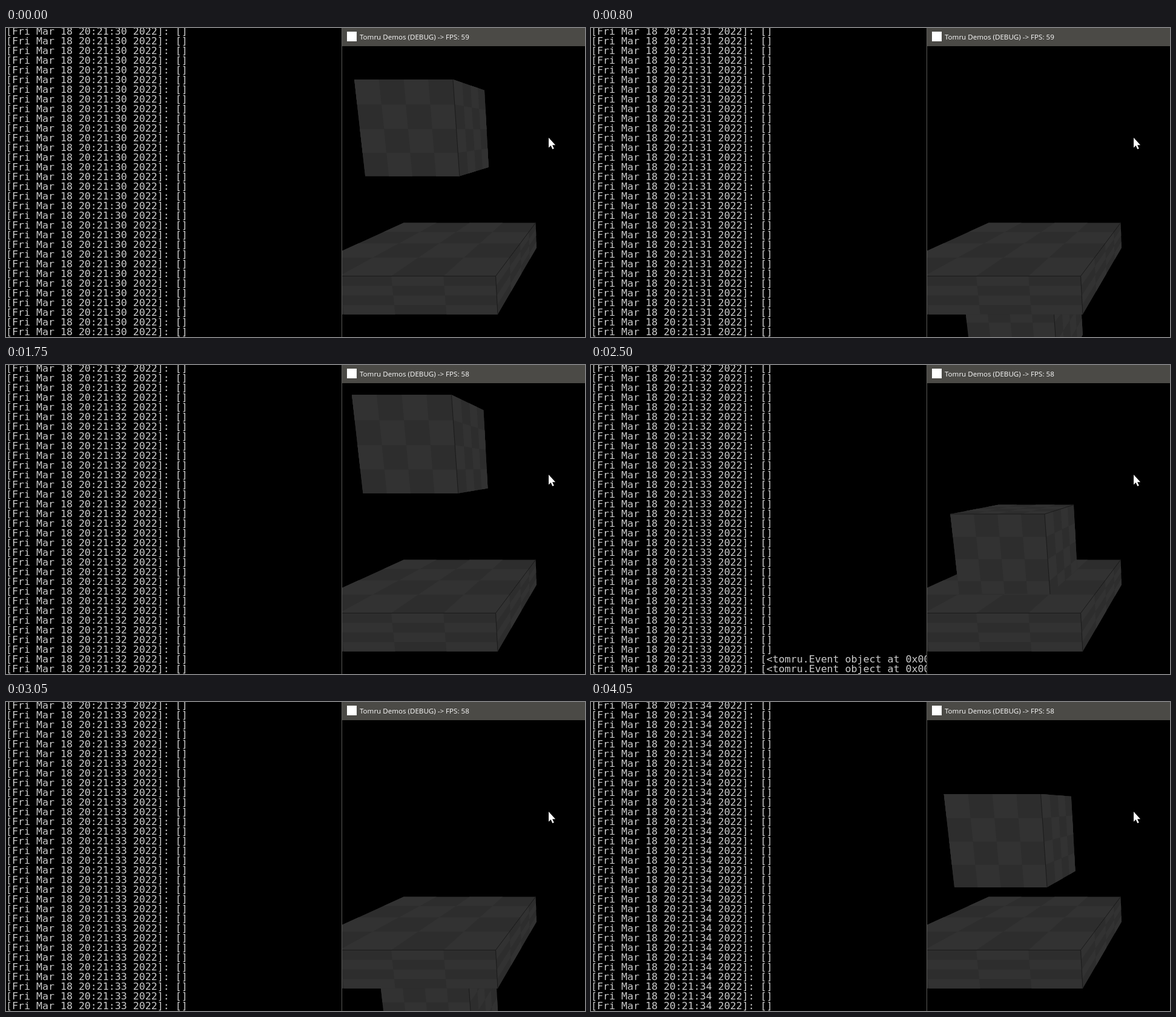
Animation, 956 px wide and 510 px high, one loop 4.1 s. Source, as an HTML page with a canvas:

```html
<!DOCTYPE html>
<html lang="en">
<head>
<meta charset="utf-8">
<title>Collision log</title>
<style>
  html, body { margin: 0; width: 100%; height: 100%; overflow: hidden; background: #000; }
  canvas { display: block; }
</style>
</head>
<body>
<canvas id="stage" width="956" height="510"></canvas>
<script>
const ctx = document.getElementById('stage').getContext('2d');
const LOOP = 4100, ROWS = 32, ROW_MS = 1000 / 120;

// The picture is redrawn in bursts and holds still between them
const bursts = [
  { start: 50, end: 800, step: 47 },
  { start: 1130, end: 1750, step: 48.5 },
  { start: 2310, end: 3050, step: 47.5 },
  { start: 3260, end: 4050, step: 48 }
];

// Each move eases the cube's top to a new height
const START_TOP = 1.03;
const moves = [
  { start: 40, to: -3.8, tau: 245, power: 1.8 },
  { start: 1130, to: 1.45, tau: 287, power: 3.67 },
  { start: 2300, to: -3.95, tau: 268, power: 1.8 },
  { start: 3260, to: 0.225, tau: 458, power: 5 }
];

const slab = { x: -6.08, y: -2.73, z: 6.71, w: 4, h: 0.79, d: 4.19 };

function shownTime(time) {
  const burst = bursts.findLast(b => time >= b.start);
  if (!burst) return 0;
  const { start, end, step } = burst;
  return time >= end ? end : start + Math.floor((time - start) / step) * step;
}

function cubeTop(t) {
  return moves.reduce((y, { start, to, tau, power }) => {
    const age = Math.max(0, t - start) / tau;
    return to + (y - to) * Math.exp(-(age ** power));
  }, START_TOP);
}

function touching(t) {
  const y = cubeTop(t);
  return y < -0.775 && y > -3.635;
}

// Perspective camera, tilted down by ten degrees
const SIN = Math.sin(Math.PI / 18), COS = Math.cos(Math.PI / 18), FOCAL = 611;
function project([x, y, z]) {
  const k = FOCAL / (z * COS - y * SIN);
  return [988 + x * k, 278 - (y * COS + z * SIN) * k];
}

function trace(points, floor) {
  ctx.beginPath();
  for (const [x, y, z] of points) ctx.lineTo(...project([x, Math.max(y, floor), z]));
}

// Checkered 4 by 4 face spanned by u and v from corner o
function face(o, u, v, floor) {
  const at = (i, j) => o.map((c, n) => c + u[n] * i / 4 + v[n] * j / 4);
  const quad = (i, j, s, color) => {
    trace([at(i, j), at(i + s, j), at(i + s, j + s), at(i, j + s)], floor);
    ctx.fillStyle = color;
    ctx.fill();
  };
  quad(0, 0, 4, '#2d2d2d');
  for (let i = 0; i < 4; i++)
    for (let j = i % 2; j < 4; j += 2) quad(i, j, 1, '#323232');
}

function box({ x, y, z, w, h, d }, floor = -99) {
  const r = x + w;
  face([x, y, z], [w, 0, 0], [0, -h, 0], floor);
  face([r, y, z], [0, 0, d], [0, -h, 0], floor);
  if (y < 0) face([x, y, z + d], [w, 0, 0], [0, 0, -d], floor);
  ctx.strokeStyle = '#1b1b1b';
  ctx.lineWidth = 1;
  trace([[r, y - h, z], [r, y, z]], floor);
  ctx.stroke();
  if (y < 0) {
    trace([[x, y, z], [r, y, z], [r, y, z + d]], floor);
    ctx.stroke();
  }
}

function drawLog(t) {
  ctx.font = '16.6px "DejaVu Sans Mono", monospace';
  ctx.fillStyle = '#ccc';
  for (let row = 0; row < ROWS; row++) {
    const at = t - (ROWS - 1 - row) * ROW_MS;
    const sec = 31 + Math.floor((at - 305) / 1000);
    const list = touching(at) ? '[<tomru.Event object at 0x00' : '[]';
    ctx.fillText(`[Fri Mar 18 20:21:${sec} 2022]: ${list}`, 0, 11 + 16 * row);
  }
}

function drawScene(t) {
  const cube = { x: -5.07, y: cubeTop(t), z: 7.8, w: 2, h: 1.97, d: 2 };
  ctx.save();
  ctx.beginPath();
  ctx.rect(555, 30, 401, 480);
  ctx.clip();
  box(cube);
  box(slab);
  // The part above the slab stands in front of it
  if (cube.y > slab.y) box(cube, slab.y);
  ctx.restore();
}

function drawWindow(t) {
  ctx.fillStyle = '#000';
  ctx.fillRect(554, 0, 402, 510);
  drawScene(t);
  ctx.fillStyle = '#4b4a46';
  ctx.fillRect(554, 0, 402, 30);
  ctx.fillStyle = '#5a5a58';
  ctx.fillRect(554, 0, 1, 510);
  ctx.fillStyle = '#fff';
  ctx.fillRect(563, 6, 16, 16);
  ctx.font = '11.6px "Open Sans", "Noto Sans", sans-serif';
  ctx.fillText(`Tomru Demos (DEBUG) -> FPS: ${t < 1305 ? 59 : 58}`, 584, 19);
  ctx.fill(new Path2D('M896 181v16.5l3.6-3.5 2.7 6 2.5-1-2.7-5.8h5z'));
}

function frame(now) {
  const t = shownTime(now % LOOP);
  ctx.fillStyle = '#000';
  ctx.fillRect(0, 0, 956, 510);
  drawLog(t);
  drawWindow(t);
  requestAnimationFrame(frame);
}
frame(0);
</script>
</body>
</html>
```
